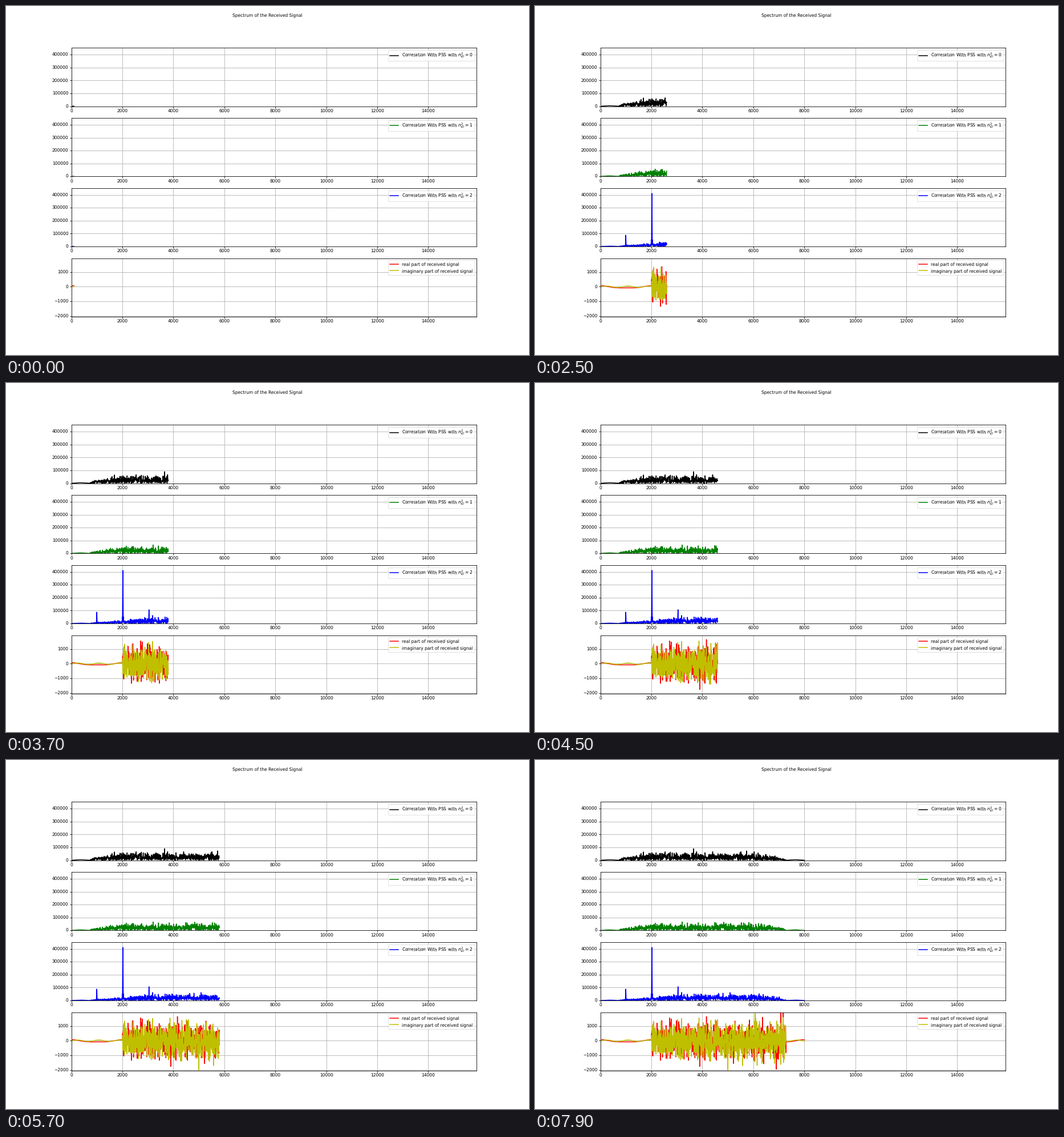
A matplotlib script that plays this animation: 917x611 px, repeating every 8 s.

```python
import numpy as np
import matplotlib.pyplot as plt
from matplotlib.animation import FuncAnimation

plt.rcParams.update({
    "text.hinting": "no_hinting",
    "lines.linewidth": 2,
    "axes.linewidth": 1.1,
    "grid.linewidth": 1.1,
    "xtick.major.width": 1.1,
    "ytick.major.width": 1.1,
})

W, H, DPI = 917, 611, 54
FRAMES, STEP = 80, 100
N = FRAMES * STEP
START, END = 2010, 7280      # burst in the received signal
SYMBOL, WINDOW = 1024, 1280
PSS_AT = 2020

rng = np.random.default_rng(7)
x = np.arange(N)


def band_noise(width):
    """Complex noise limited to |f| < width, unit variance per component."""
    spec = rng.normal(size=N) + 1j * rng.normal(size=N)
    spec[np.abs(np.fft.fftfreq(N)) > width] = 0
    z = np.fft.ifft(spec)
    return z / z.real.std()


def ramp(start, length):
    return np.clip((x - start) / length, 0, 1)


def correlation(level, hump):
    """Noise whose power follows the overlap of window and burst."""
    first = START - WINDOW
    overlap = ramp(first, WINDOW) * (1 - ramp(END - WINDOW, WINDOW))
    noise = level * np.sqrt(overlap) * np.abs(band_noise(0.045))
    calm = 500 + hump * np.sin(np.pi * (x % END) / first) ** 2
    return np.where((x > first) & (x < END), noise, calm)


def spike(center, height):
    d = np.abs(x - center)
    return height * np.abs(np.sinc(d / 16)) * np.exp(-d / 40)


def received(calm):
    burst = (440 + 90 * ramp(START, SYMBOL)) * band_noise(0.08).real
    return np.where((x >= START) & (x < END), burst, calm)


corrs = [
    correlation(20000, 4200),
    correlation(19000, 3500),
    correlation(8000 + 9500 * ramp(START, SYMBOL), 2500),
]
for k, height in enumerate((88000, 412000, 107000)):
    corrs[2] = np.maximum(corrs[2], spike(PSS_AT + (k - 1) * SYMBOL, height))

phase = 2 * np.pi * x / 2000
real = received(75 * np.cos(phase) + 25 * np.cos(2 * phase) - 25)
imag = received(50 * np.sin(2 * np.pi * (x - 40) / 830))

fig, axes = plt.subplots(4, 1, figsize=(W / DPI, H / DPI), dpi=DPI)
fig.suptitle("Spectrum of the Received Signal", fontsize=10)

series = []


def add_series(ax, data, color, label):
    line, = ax.plot([], [], color, label=label)
    series.append((line, data))


for i, (ax, data, color) in enumerate(zip(axes, corrs, "kgb")):
    add_series(ax, data, color, rf"Correlation With PSS with $n_{{ID}}^2={i}$")
    ax.set_ylim(0, 453000)
add_series(axes[3], real, "r", "real part of received signal")
add_series(axes[3], imag, "y", "imaginary part of received signal")
axes[3].set_ylim(-2031, 1941)

for ax in axes:
    ax.set_xlim(0, 15900)
    ax.grid(True)
    ax.legend(loc="upper right")


def update(frame):
    n = (frame + 1) * STEP
    for line, data in series:
        line.set_data(x[:n], data[:n])
    return [line for line, _ in series]


anim = FuncAnimation(fig, update, frames=FRAMES, interval=100, repeat=True,
                     repeat_delay=0, init_func=lambda: update(0))
plt.show()
```
